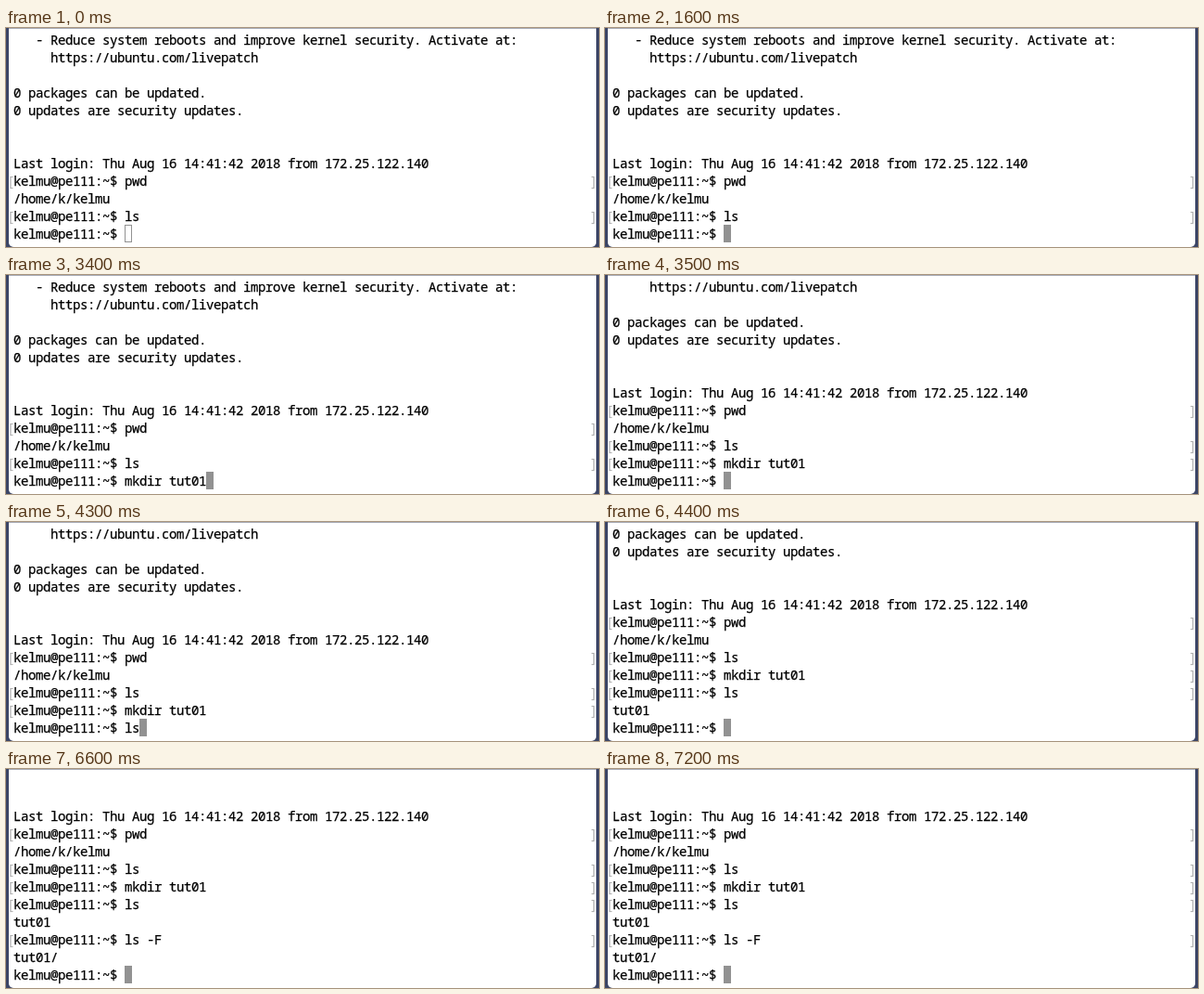
Recreate the animation shown at these times as an HTML page. Size 640 px wide and 236 px high, loop 8000 ms.

```html
<!DOCTYPE html>
<html lang="en">
<head>
<meta charset="utf-8">
<title>Terminal</title>
<style>
  html, body { margin: 0; width: 100%; height: 100%; overflow: hidden; background: #3b4566; }
  #stage { position: relative; width: 640px; height: 236px; overflow: hidden; }
  #window {
    position: absolute; left: 3px; top: 0; width: 634px; height: 236px;
    box-sizing: border-box; border-top: 1px solid #a9adb9;
    background: #fff; border-radius: 0 0 5px 5px;
  }
  #screen {
    position: absolute; left: 8px; top: 3px; width: 632px;
    font: 500 14px/19px "Noto Sans Mono", monospace;
    letter-spacing: calc(8px - .6em);
    -webkit-text-stroke: .25px #000;
    color: #000; white-space: pre; font-variant-ligatures: none;
  }
  .row { position: relative; height: 19px; }
  .mark::before, .mark::after {
    position: absolute; top: 0; color: #b0b0b0;
    font-weight: 400; -webkit-text-stroke: 0;
  }
  .mark::before { content: "["; left: -7px; }
  .mark::after { content: "]"; left: 622px; }
  #cursor {
    position: absolute; top: 212px; width: 8px; height: 19px;
    box-sizing: border-box; border: 1px solid #929292;
  }
  #cursor.solid { background: #929292; }
</style>
</head>
<body>
<div id="stage">
  <div id="window"></div>
  <div id="screen"></div>
  <div id="cursor"></div>
</div>
<script>
  const LOOP = 8000, ROWS = 12, CELL = 8, FOCUS = 300;
  const PROMPT = "kelmu@pe111:~$ ";
  const HISTORY = [
    "   - Reduce system reboots and improve kernel security. Activate at:",
    "     https://ubuntu.com/livepatch",
    "",
    "0 packages can be updated.",
    "0 updates are security updates.",
    "",
    "",
    "Last login: Thu Aug 16 14:41:42 2018 from 172.25.122.140",
    PROMPT + "pwd",
    "/home/k/kelmu",
    PROMPT + "ls"
  ];
  // Key times for each command; the last one is Enter.
  const COMMANDS = [
    { text: "mkdir tut01", output: [],
      keys: [1700, 1800, 2000, 2100, 2200, 2400, 2900, 3000, 3100, 3200, 3400, 3500] },
    { text: "ls", output: ["tut01"], keys: [4000, 4200, 4400] },
    { text: "ls -F", output: ["tut01/"], keys: [5500, 5600, 5600, 5700, 5900, 6600] }
  ];

  const screen = document.getElementById("screen");
  const cursor = document.getElementById("cursor");
  const rows = Array.from({ length: ROWS }, () => {
    const row = document.createElement("div");
    row.className = "row";
    return screen.appendChild(row);
  });

  function linesAt(t) {
    const lines = HISTORY.slice();
    for (const { text, output, keys } of COMMANDS) {
      const pressed = keys.filter(k => k <= t).length;
      lines.push(PROMPT + text.slice(0, pressed));
      if (pressed < keys.length) return lines;
      lines.push(...output);
    }
    return lines.concat(PROMPT);
  }

  let shown = "";
  function draw(now) {
    const t = now % LOOP;
    const lines = linesAt(t).slice(-ROWS);
    const state = lines.join("\n");
    if (state !== shown) {
      shown = state;
      rows.forEach((row, i) => {
        row.textContent = lines[i];
        row.classList.toggle("mark", i < ROWS - 1 && lines[i].startsWith(PROMPT));
      });
      cursor.style.left = CELL * (1 + lines[ROWS - 1].length) + "px";
    }
    cursor.classList.toggle("solid", t >= FOCUS);
  }

  const start = performance.now();
  function tick() {
    draw(performance.now() - start);
    requestAnimationFrame(tick);
  }
  tick();
</script>
</body>
</html>
```
